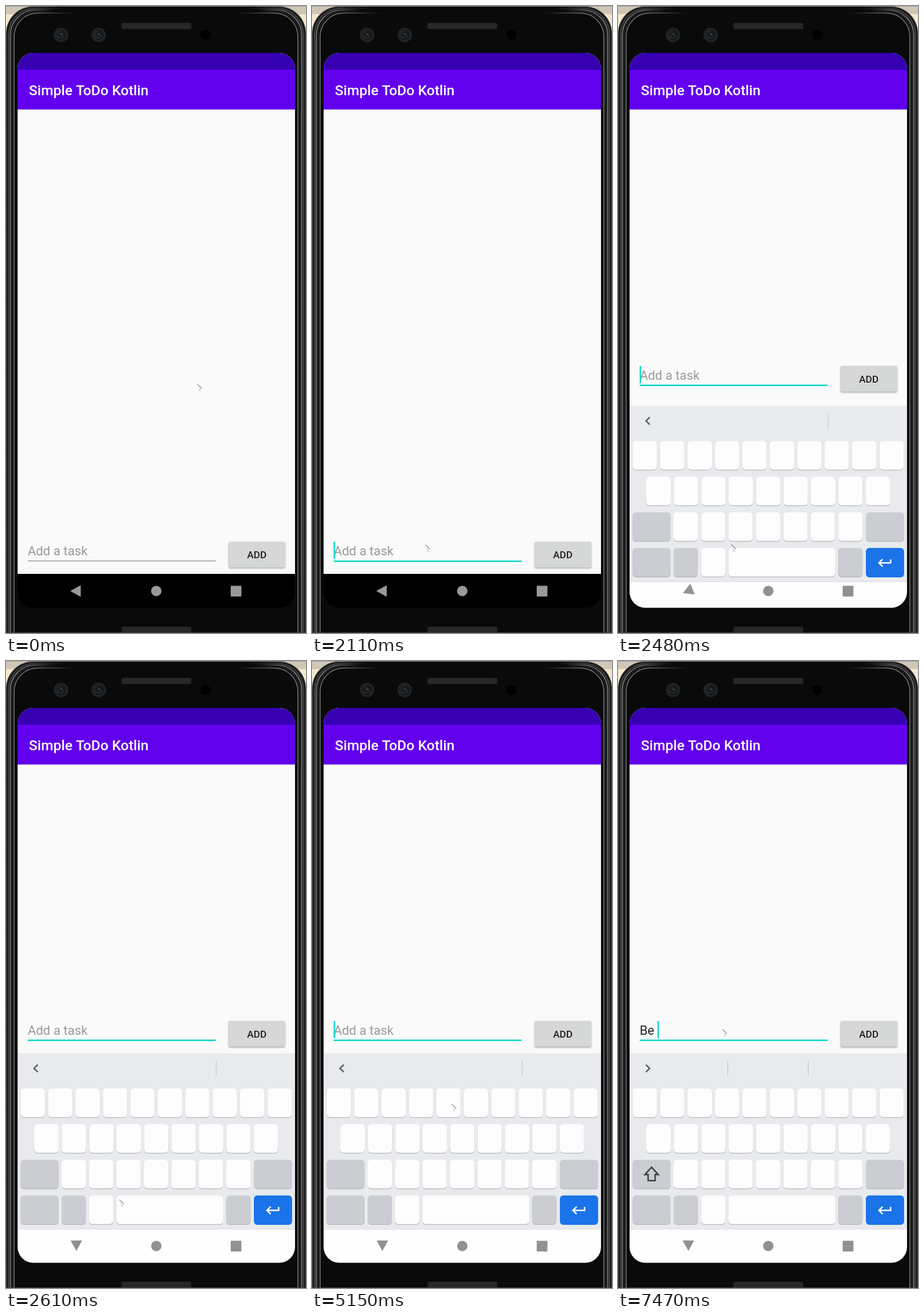
These frames come from a looping animation (518x1082 px, 8 s). An HTML page with a canvas:

```html
<!DOCTYPE html>
<html lang="en">
<head>
<meta charset="utf-8">
<title>Simple ToDo Kotlin</title>
<style>
html, body { margin: 0; width: 100%; height: 100%; overflow: hidden; background: #0a0a0a; }
canvas { display: block; width: 518px; height: 1082px; }
</style>
</head>
<body>
<canvas id="stage" width="518" height="1082"></canvas>
<script>
const W = 518, H = 1082, LOOP = 8000;
const stage = document.getElementById('stage').getContext('2d');
const layer = document.createElement('canvas');
layer.width = W;
layer.height = H;
const layerCtx = layer.getContext('2d');
let ctx = stage;

const TEAL = '#0fd8c8', INK = '#212121';
const INPUT_FONT = '21.94px Roboto, sans-serif';

// Icons on a 24-unit grid
const DP = 1.22;
const ENTER = new Path2D('M19 7v4H5.83l3.58-3.59L8 6l-6 6 6 6 1.41-1.41L5.83 13H21V7z');
const BACKWARD = new Path2D('M15.41 7.41L14 6l-6 6 6 6 1.41-1.41L10.83 12z');
const FORWARD = new Path2D('M10 6L8.59 7.41 13.17 12l-4.58 4.59L10 18l6-6z');

// Each track lists [start time, value]; the value holds until the next entry.
const POINTER = [
  [0, [330, 652]], [1420, [295, 764]], [1570, [245, 892]], [1690, [215, 916]],
  [1840, [198, 929]], [1980, [195.5, 929]], [3210, [147, 655]], [3340, [131, 540]],
  [3910, [170.5, 627.5]], [4040, [220, 700]], [4160, [268, 769]], [4470, [253, 834]],
  [4620, [310, 903]], [5150, [241, 764]], [5300, [180, 635]]
];
const CARET = [
  [0, false], [2110, true], [2610, false], [3070, true], [3610, false], [4160, true],
  [4620, false], [5150, true], [5610, false], [6030, true], [6590, false], [6870, true]
];
const TYPED = [[0, ''], [6870, 'B'], [7170, 'Be'], [7320, 'Be ']];
const KEYBOARD = [
  [0, null],
  [2360, { dy: 205, alpha: 0.3, turn: 0 }],
  [2480, { dy: 13, alpha: 1, turn: 22 }],
  [2610, { dy: 0, alpha: 1, turn: 90 }]
];

function at(track, t) {
  let value = track[0][1];
  for (const [start, v] of track) if (t >= start) value = v;
  return value;
}

function rect(x, y, w, h, fill) {
  ctx.fillStyle = fill;
  ctx.fillRect(x, y, w, h);
}

function round(x, y, w, h, r, fill) {
  ctx.beginPath();
  ctx.roundRect(x, y, w, h, r);
  ctx.fillStyle = fill;
  ctx.fill();
}

function disc(x, y, r, fill) {
  ctx.beginPath();
  ctx.arc(x, y, r, 0, Math.PI * 2);
  ctx.fillStyle = fill;
  ctx.fill();
}

function trace(points, close) {
  ctx.beginPath();
  points.forEach(([x, y]) => ctx.lineTo(x, y));
  if (close) ctx.closePath();
}

function line(points, color, width, close) {
  trace(points, close);
  ctx.strokeStyle = color;
  ctx.lineWidth = width;
  ctx.stroke();
}

function icon(path, x, y, fill) {
  ctx.save();
  ctx.translate(x, y);
  ctx.scale(DP, DP);
  ctx.translate(-12, -12);
  ctx.fillStyle = fill;
  ctx.fill(path);
  ctx.restore();
}

function text(s, x, y, font, fill, align = 'left') {
  ctx.font = font;
  ctx.fillStyle = fill;
  ctx.textAlign = align;
  ctx.fillText(s, x, y);
}

// Metallic outline that fades out along the top edge
function rim(inset, color, width, reach) {
  const g = ctx.createLinearGradient(0, 0, W, 0);
  const clear = color + '00', edge = reach / W;
  g.addColorStop(0, color);
  g.addColorStop(edge * 0.4, color);
  g.addColorStop(edge, clear);
  g.addColorStop(1 - edge, clear);
  g.addColorStop(1 - edge * 0.4, color);
  g.addColorStop(1, color);
  ctx.beginPath();
  ctx.roundRect(inset, inset * 0.8 + 1, W - inset * 2, H + 100, 46 - inset * 0.4);
  ctx.strokeStyle = g;
  ctx.lineWidth = width;
  ctx.stroke();
}

function speaker(y) {
  round(199, y, 121, 11, 3, '#242424');
  ctx.fillStyle = '#343434';
  for (let j = 2; j < 10; j += 2)
    for (let i = 3 + j / 2 % 2; i < 118; i += 2) ctx.fillRect(199 + i, y + j, 1, 1);
}

function camera(x) {
  disc(x, 50, 12.5, '#202427');
  disc(x, 50, 9, '#15181a');
  ctx.strokeStyle = '#33373a';
  ctx.lineWidth = 1.2;
  for (const [r, from, to] of [[7, 2.2, 4.6], [5, 0, 2.6], [3, 3.4, 5.6]]) {
    ctx.beginPath();
    ctx.arc(x, 50, r, from, to);
    ctx.stroke();
  }
  disc(x + 1, 49, 1.5, '#45494c');
}

function phone() {
  rect(0, 0, W, H, '#f3e8cd');
  rect(0, 0, W, 14, '#cfc7b6');
  rect(0, 0, W, 1, '#a09ba6');
  round(0.5, 1, W - 1, H + 100, 46, '#0a0a0a');
  rim(1, '#333333', 1.6, 90);
  rim(4.5, '#3a3a3a', 3, 100);
  rim(7.5, '#858585', 1.6, 80);
  rim(10.5, '#1c1c1c', 3, 100);
  rim(14, '#757575', 1.6, 120);
  speaker(29);
  speaker(1071);
  camera(95);
  camera(160);
  disc(344, 50, 9, '#000');
  rect(0, H - 1, W, 1, '#45434a');
}

function shadow(blur, dy, alpha, draw) {
  ctx.save();
  ctx.shadowColor = `rgba(0,0,0,${alpha})`;
  ctx.shadowBlur = blur;
  ctx.shadowOffsetY = dy;
  draw();
  ctx.restore();
}

function appBar() {
  rect(20, 81, 479, 899, '#fafafa');
  shadow(3, 0.5, 0.18, () => rect(20, 109, 479, 69.5, '#6200ee'));
  rect(20, 81, 479, 29, '#3700b3');
  text('Simple ToDo Kotlin', 39.5, 154, '500 24.4px Roboto, sans-serif', '#fff');
}

function inputRow(t, raised) {
  const typed = at(TYPED, t);
  ctx.save();
  ctx.translate(0, raised ? -303.5 : 0);
  text(typed || 'Add a task', 37.4, 948, INPUT_FONT, typed ? INK : '#999');
  const width = ctx.measureText(typed).width;
  if (t >= 7020 && t < 7470) rect(37.4, 949.7, ctx.measureText(typed.trim()).width, 1.6, INK);
  if (t >= 1980) rect(37.5, 956.8, 324.5, 2.6, TEAL);
  else rect(37.5, 957, 324.5, 1.2, '#858585');
  if (at(CARET, t)) rect(37.4 + width, 924.5, 2.5, 30, TEAL);
  shadow(3, 1.5, 0.35, () => round(384.5, 924.5, 97.5, 44.5, 2.4, '#d6d7d7'));
  text('ADD', 433, 953, '500 17.07px Roboto, sans-serif', INK, 'center');
  ctx.restore();
}

function key(x, y, w, fill) {
  round(x, y + 1.2, w, 49.5, 6, '#b4b6ba');
  round(x, y, w, 49.5, 6, fill);
}

function keyRow(x, y, count) {
  for (let i = 0; i < count; i++) key(x + i * 47.35, y, 42, '#fdfdfd');
}

function suggestions(t) {
  const open = t >= 7020;
  icon(open ? FORWARD : BACKWARD, 51.5, 703, '#5a5d61');
  for (const x of open ? [189, 328] : [362.5]) rect(x, 689.5, 1, 27.5, '#bfc1c4');
}

function keyboard(t) {
  const GREY = '#cbcdd2';
  rect(20, 677, 479, 304, '#e8eaed');
  rect(20, 980, 479, 1, '#dcdee1');
  rect(20, 981, 479, 70, '#fefefe');
  suggestions(t);
  keyRow(25.3, 737.8, 10);
  keyRow(49, 799.2, 9);
  keyRow(96, 860.7, 7);
  key(25.3, 860.7, 65.7, GREY);
  key(428, 860.7, 66, GREY);
  key(25.3, 922.2, 65.7, GREY);
  key(96, 922.2, 42, GREY);
  key(143.3, 922.2, 42, '#fdfdfd');
  key(190.7, 922.2, 184.5, '#fdfdfd');
  key(380.2, 922.2, 42, GREY);
  round(428, 922.2, 66, 50.7, 6, '#1a73e8');
  icon(ENTER, 461, 948, '#fff');
  if (t >= 6870) {
    line([[58, 873.7], [69.5, 886.3], [64, 886.3], [64, 896.8],
      [52, 896.8], [52, 886.3], [46.5, 886.3]], '#3c4043', 2.5, true);
  }
}

// Draws the keyboard on its own layer so that it fades as one piece
function showKeyboard(t, { dy, alpha }) {
  ctx = layerCtx;
  ctx.clearRect(0, 0, W, H);
  ctx.save();
  ctx.translate(0, dy);
  keyboard(t);
  ctx.restore();
  ctx = stage;
  ctx.globalAlpha = alpha;
  ctx.drawImage(layer, 0, 0);
  ctx.globalAlpha = 1;
}

function navIcons(color, turn) {
  ctx.save();
  ctx.translate(120.5, 1008.5);
  ctx.rotate(-turn * Math.PI / 180);
  trace([[-9.5, 1], [8.5, -9], [8.5, 11]], true);
  ctx.fillStyle = color;
  ctx.fill();
  ctx.restore();
  disc(259.5, 1009.5, 9, color);
  round(388, 1000.5, 18.5, 18.5, 1, color);
}

function pointer([x, y]) {
  ctx.save();
  ctx.translate(x, y);
  line([[0.3, 0.7], [8, 8.2]], '#3c3c3c', 1);
  line([[3, 10], [4.5, 8.4], [6, 9.6]], '#8c8c8c', 0.8);
  line([[3.6, 11], [4.6, 12.6], [5.8, 11.6]], '#8c8c8c', 0.8);
  ctx.restore();
}

function draw(t) {
  const kb = at(KEYBOARD, t);
  phone();
  ctx.save();
  ctx.beginPath();
  ctx.roundRect(20, 81, 479, 957.5, 27);
  ctx.clip();
  appBar();
  rect(20, 980, 479, 60, '#000');
  inputRow(t, kb);
  if (kb) showKeyboard(t, kb);
  navIcons(!kb ? '#999' : kb.alpha < 1 ? '#a6a6a6' : '#919191', kb ? kb.turn : 0);
  ctx.restore();
  pointer(at(POINTER, t));
}

const begin = performance.now();
function tick() {
  draw((performance.now() - begin) % LOOP);
  requestAnimationFrame(tick);
}
tick();
</script>
</body>
</html>
```
